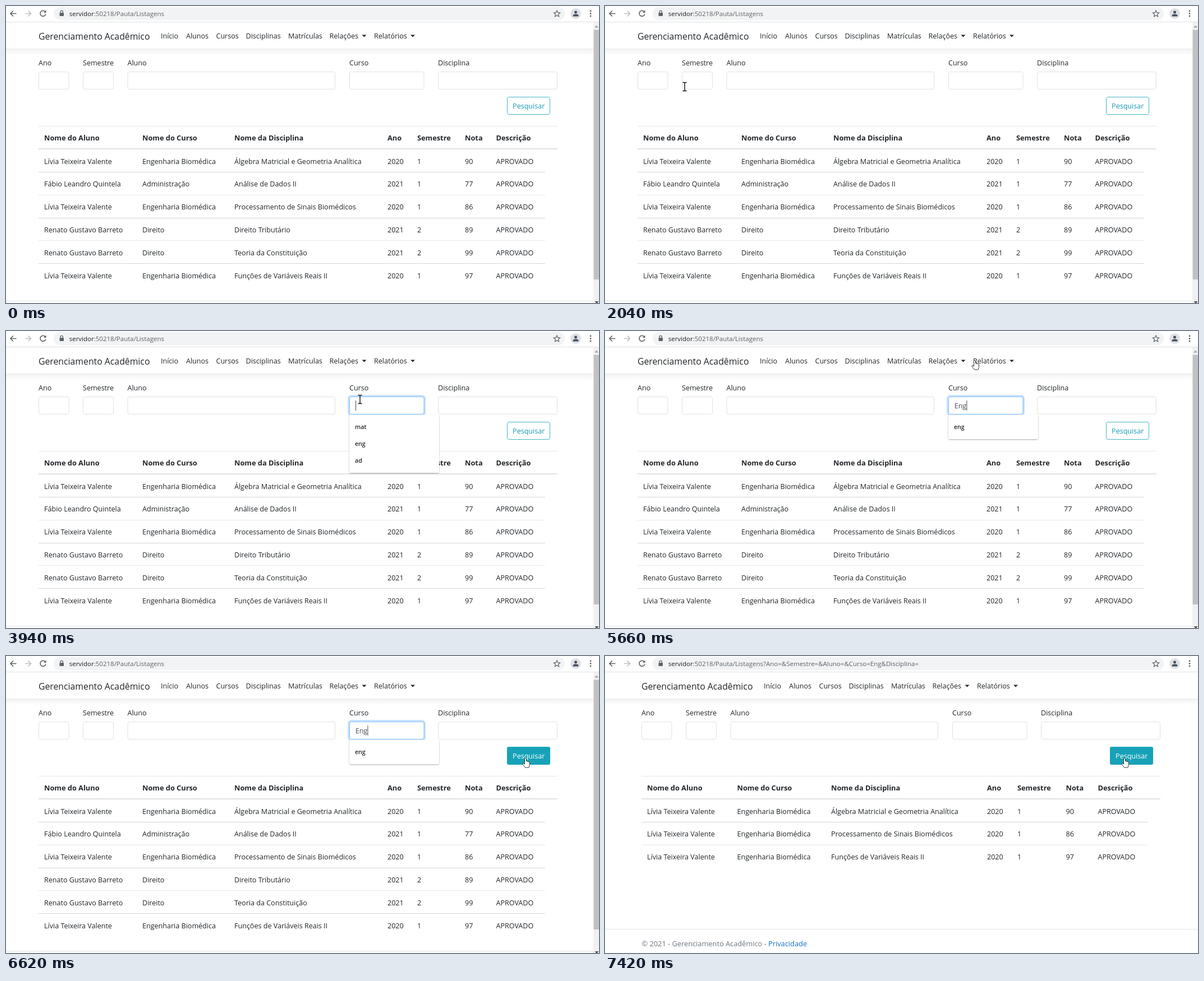
An HTML page that plays this animation: 1057x530 px, repeating every 8 s.

```html
<!DOCTYPE html>
<html lang="pt-BR">
<head>
<meta charset="utf-8">
<title>Gerenciamento Acadêmico</title>
<style>
  html, body { margin: 0; width: 100%; height: 100%; overflow: hidden; background: #fff; }
  svg { display: block; width: 100vw; height: 100vh; }
  text { font: 12.55px "Open Sans", "Noto Sans", sans-serif; fill: #212529; white-space: pre; }
  .brand { font-size: 15.8px; }
  .head { font-size: 12.8px; font-weight: 700; }
  .url { font-size: 11.5px; fill: #5f6368; }
  .hint { font-size: 10.6px; font-weight: 600; }
  .typed { fill: #495057; }
  .muted { font-size: 12.8px; fill: #6c757d; }
  .link { fill: #1271c9; }
  .icon { fill: none; stroke: #5f6368; stroke-width: 1.6; }
</style>
</head>
<body>
<svg id="stage" viewBox="0 0 1057 530"></svg>
<script>
const LOOP = 8000;
const SUBMIT = 6800, LOADING = 6960, LOADED = 7350;
const ADDRESS = ':50218/Pauta/Listagens';
const QUERY = '?Ano=&Semestre=&Aluno=&Curso=Eng&Disciplina=';

const text = (x, y, content, cls = '') => `<text x="${x}" y="${y}" class="${cls}">${content}</text>`;
const rect = (x, y, w, h, attrs) => `<rect x="${x}" y="${y}" width="${w}" height="${h}" ${attrs}/>`;
const path = (d, attrs) => `<path d="${d}" ${attrs}/>`;
const rule = (x1, x2, y, color = '#dee2e6', width = 1) =>
  path(`M${x1} ${y}H${x2}`, `stroke="${color}" stroke-width="${width}"`);

const fields = [['Ano', 58, 54], ['Semestre', 137, 54.5], ['Aluno', 216.5, 370],
                ['Curso', 612, 133], ['Disciplina', 770, 212.5]];
const menu = [['Início', 276], ['Alunos', 321], ['Cursos', 374.5], ['Disciplinas', 427.5],
              ['Matrículas', 503], ['Relações', 576.5], ['Relatórios', 656]];

const headings = ['Nome do Aluno', 'Nome do Curso', 'Nome da Disciplina', 'Ano', 'Semestre', 'Nota', 'Descrição'];
const livia = 'Lívia Teixeira Valente', fabio = 'Fábio Leandro Quintela', renato = 'Renato Gustavo Barreto';
const eng = 'Engenharia Biomédica';
const records = [
  [livia, eng, 'Álgebra Matricial e Geometria Analítica', 2020, 1, 90],
  [fabio, 'Administração', 'Análise de Dados II', 2021, 1, 77],
  [livia, eng, 'Processamento de Sinais Biomédicos', 2020, 1, 86],
  [renato, 'Direito', 'Direito Tributário', 2021, 2, 89],
  [renato, 'Direito', 'Teoria da Constituição', 2021, 2, 99],
  [livia, eng, 'Funções de Variáveis Reais II', 2020, 1, 97],
];

function table(left, columns, rows) {
  const cells = (values, y, cls) => values.map((v, i) => text(columns[i], y, v, cls)).join('');
  return rule(left, left + 925, 214.5, '#e4e7ea') + cells(headings, 240, 'head') +
    rule(left, left + 925, 255, '#d5d9dd', 1.6) +
    rows.map((row, i) => cells([...row, 'APROVADO'], 281.6 + i * 40.85) +
      (i < rows.length - 1
        ? rule(left, left + 903, Math.floor(296.4 + i * 40.85) + .5, i % 2 ? '#e4e7ea' : '#d3d7da')
        : '')).join('');
}

const toolbar =
  rect(0, 0, 1057, 28, 'fill="#fff"') + rule(0, 1057, 28.5, '#dfe1e4') +
  rect(85, 2, 911, 23, 'rx="11.5" fill="#f1f3f4"') +
  path('M18.5 13.5H8M13 8.5l-5 5 5 5', 'class="icon"') +
  path('M34 13.5H44.5M39.5 8.5l5 5-5 5', 'class="icon" style="stroke:#bcbec1"') +
  `<g id="reload">${path('M70 10.2A5 5 0 1 0 70.9 14.5', 'class="icon"')}
   ${path('M71.5 7.5V12H67Z', 'fill="#5f6368"')}</g>` +
  path('M61.5 9l9 9M70.5 9l-9 9', 'class="icon" id="stop"') +
  rect(95.5, 12, 7.5, 6, 'rx="1" fill="#5f6368"') +
  path('M97 12V10.5a2.2 2.2 0 0 1 4.4 0V12', 'class="icon" style="stroke-width:1.2"') +
  `<text x="112.7" y="17.5" class="url"><tspan fill="#202124">servidor</tspan><tspan id="address"></tspan></text>` +
  path('M982 8l1.6 3.7 4 .4-3 2.7.9 3.9-3.5-2-3.5 2 .9-3.9-3-2.7 4-.4Z', 'class="icon" style="stroke-width:1.2"') +
  '<circle cx="1015.5" cy="13.5" r="9.5" fill="#dfe1e5"/><circle cx="1015.5" cy="11" r="2.5" fill="#45505f"/>' +
  path('M1010.5 18.5v-1.5q0-2.5 5-2.5t5 2.5v1.5Z', 'fill="#45505f"') +
  [9, 13.5, 18].map(y => `<circle cx="1042" cy="${y}" r="1.4" fill="#5f6368"/>`).join('');

const navbar =
  rect(0, 77, 1057, 11, 'fill="url(#shade)"') + rule(0, 1057, 76.5, '#e9ebed');

const form =
  text(58, 59.5, 'Gerenciamento Acadêmico', 'brand') +
  menu.map(([label, x]) => text(x, 58.4, label)).join('') +
  [634.5, 721].map(x => path(`M${x} 51.5h8l-4 4Z`, 'fill="#212529"')).join('') +
  fields.map(([label, x, w]) => text(x, 106, label) +
    rect(x + .5, 117.5, w - .5, 31, 'rx="3.3" fill="#fff" stroke="#dde1e5"')).join('') +
  `<g id="focus">${rect(610.5, 115.5, 136, 35, 'rx="5" fill="none" stroke="#007bff" stroke-opacity=".25" stroke-width="2.7"')}
   ${rect(612.5, 117.5, 132.5, 31, 'rx="3.3" fill="#fff" stroke="#80bdff"')}</g>` +
  '<text id="typed" class="typed" x="622.7" y="138"></text>' +
  rect(623, 124, 1, 18, 'id="caret" fill="#495057"') +
  rect(891.8, 160.8, 79.4, 34.4, 'id="glow" rx="4.5" fill="none" stroke="#17a2b8" stroke-opacity=".5" stroke-width="2.8"') +
  rect(893.5, 162.5, 76, 31, 'rx="3.3" fill="#fff" stroke="#45b4c6"') +
  rect(893, 162, 77, 32, 'id="fill" rx="3.3" fill="#17a2b8"') +
  '<text id="search" x="931.7" y="183" text-anchor="middle">Pesquisar</text>';

const scrollbar =
  rect(1047, 29, 10, 501, 'fill="#f1f1f1"') + rect(1047.5, 42.5, 9.5, 445.5, 'id="thumb" fill="#c1c1c1"') +
  path('M1049 38.5h7l-3.5-4Z', 'fill="#a3a3a3"') + path('M1049.5 527h7l-3.5 4Z', 'fill="#505050"');

const cursors =
  `<g id="cursor">
   ${path('M0 0V13.5L3.2 10.6 5.3 15.5 7.4 14.6 5.3 9.8H9.6Z', 'id="arrow" fill="#fff" stroke="#333"')}
   ${path('M-3.5-7.5H-1L0-6.5 1-7.5H3.5M0-6.5V6.5M-3.5 7.5H-1L0 6.5 1 7.5H3.5', 'id="beam" fill="none" stroke="#111" stroke-width="1.4"')}
   ${path('M-1.5 1.2Q0-1 1.5 1.2V5.5L6 6.7Q7.5 7.2 7.5 9V12.5L6 17H-.5L-4.8 11.5Q-5.5 9-3.2 9.6L-1.5 11Z', 'id="hand" fill="#fff" stroke="#333" stroke-linejoin="round"')}
   </g>`;

stage.innerHTML =
  `<defs>
     <linearGradient id="shade" x2="0" y2="1"><stop stop-color="#000" stop-opacity=".05"/><stop offset="1" stop-color="#000" stop-opacity="0"/></linearGradient>
     <filter id="drop" x="-10%" y="-10%" width="120%" height="125%"><feDropShadow dx="0" dy="1" stdDeviation="1.3" flood-opacity=".35"/></filter>
   </defs>` +
  rect(0, 0, 1057, 530, 'fill="#fff"') + toolbar + navbar +
  `<g id="before">${table(58, [68, 243, 407, 680, 733, 818, 873.5], records)}
     ${rule(0, 1047, 526.5)}${scrollbar}</g>
   <g id="after">${table(65, [75, 235.5, 403, 681, 735, 821.5, 878.5], records.filter(r => r[0] === livia))}
     ${rule(0, 1057, 487.5)}${text(65.5, 517.6, '© 2021 - Gerenciamento Acadêmico - <tspan class="link">Privacidade</tspan>', 'muted')}</g>
   <g id="form">${form}</g>
   <g id="hints"><rect id="panel" x="612" y="149.5" width="160" rx="3" fill="#fff" filter="url(#drop)"/>
     <g id="hintsAll">${['mat', 'eng', 'ad'].map((h, i) => text(622, 175 + i * 30, h, 'hint')).join('')}</g>
     <g id="hintsOne">${text(622, 175, 'eng', 'hint')}</g></g>` +
  cursors;

const el = id => document.getElementById(id);
const show = (id, on) => { el(id).style.display = on ? '' : 'none'; };
const set = (id, name, value) => el(id).setAttribute(name, value);
const ramp = (t, start, duration = 150) => Math.min(1, Math.max(0, (t - start) / duration));
const inside = (x, y, left, top, right, bottom) => x >= left && x <= right && y >= top && y <= bottom;

// Pointer stops: time, x, y. Repeated times are jumps.
const stops = [
  [520, 1010, 523], [590, 1010, 523], [590, 1032, 522], [985, 1032, 522],
  [1690, 142, 132], [1770, 175, 144], [1840, 175, 144], [1840, 124, 143], [2040, 124, 143],
  [2040, 142, 144], [2100, 142, 144], [2790, 646, 139], [3240, 646, 139], [3570, 631, 122],
  [5660, 631, 122], [5660, 659, 52], [5725, 659, 52], [6130, 798, 187], [6190, 798, 187],
  [6270, 1049, 180], [6320, 1049, 180], [6400, 936, 184], [6470, 926, 182],
];

function pointerAt(t) {
  const i = stops.findLastIndex(s => s[0] <= t);
  if (i < 0) return null;
  const [t0, x0, y0] = stops[i];
  const [t1, x1, y1] = stops[i + 1] || [LOOP, x0, y0];
  const p = (t - t0) / (t1 - t0), e = p * p * (3 - 2 * p);
  return [x0 + (x1 - x0) * e, y0 + (y1 - y0) * e];
}

function drawPointer(t) {
  const point = pointerAt(t);
  show('cursor', point);
  if (!point) return;
  const [x, y] = point;
  const beam = fields.some(([, left, w]) => inside(x, y, left, 117, left + w, 149));
  const hand = inside(x, y, 893, 162, 970, 194) || inside(x, y, 576, 40, 735, 68);
  set('cursor', 'transform', `translate(${Math.round(x)} ${Math.round(y)})`);
  show('beam', beam);
  show('hand', hand);
  show('arrow', !beam && !hand);
  set('thumb', 'fill', x >= 1047 ? '#a8a8a8' : '#c1c1c1');
}

function draw(t) {
  const loaded = t >= LOADED, busy = t >= LOADING && t < 7400;
  show('before', !loaded);
  show('after', loaded);
  set('form', 'transform', `translate(${loaded ? 7 : 0})`);
  show('stop', busy);
  show('reload', !busy);
  el('address').textContent = ADDRESS + (t >= LOADING ? QUERY : '');

  const keys = [4140, 4870, 5200];
  const count = keys.filter(k => t >= k).length;
  el('typed').textContent = loaded ? '' : 'Eng'.slice(0, count);
  set('focus', 'opacity', ramp(t, 2850) - ramp(t, SUBMIT - 20));
  const blinkStart = count ? keys[count - 1] : 2870;
  show('caret', t >= 2870 && t < SUBMIT && Math.floor((t - blinkStart) / 530) % 2 === 0);
  set('caret', 'x', 623 + [0, 6.6, 14.2, 21.4][count]);

  show('hints', t >= 3000 && t < SUBMIT);
  show('hintsAll', !count);
  show('hintsOne', count);
  set('panel', 'height', count ? 43.5 : 103.5);

  const hover = ramp(t, 6440, 170);
  const mix = (a, b) => Math.round(a + (b - a) * hover);
  set('fill', 'opacity', hover);
  el('search').style.fill = `rgb(${mix(23, 255)},${mix(152, 255)},${mix(180, 255)})`;
  set('glow', 'opacity', loaded ? 0 : ramp(t, SUBMIT - 20));
  drawPointer(t);
}

const start = performance.now();
function tick() {
  draw((performance.now() - start) % LOOP);
  requestAnimationFrame(tick);
}
tick();
</script>
</body>
</html>
```
